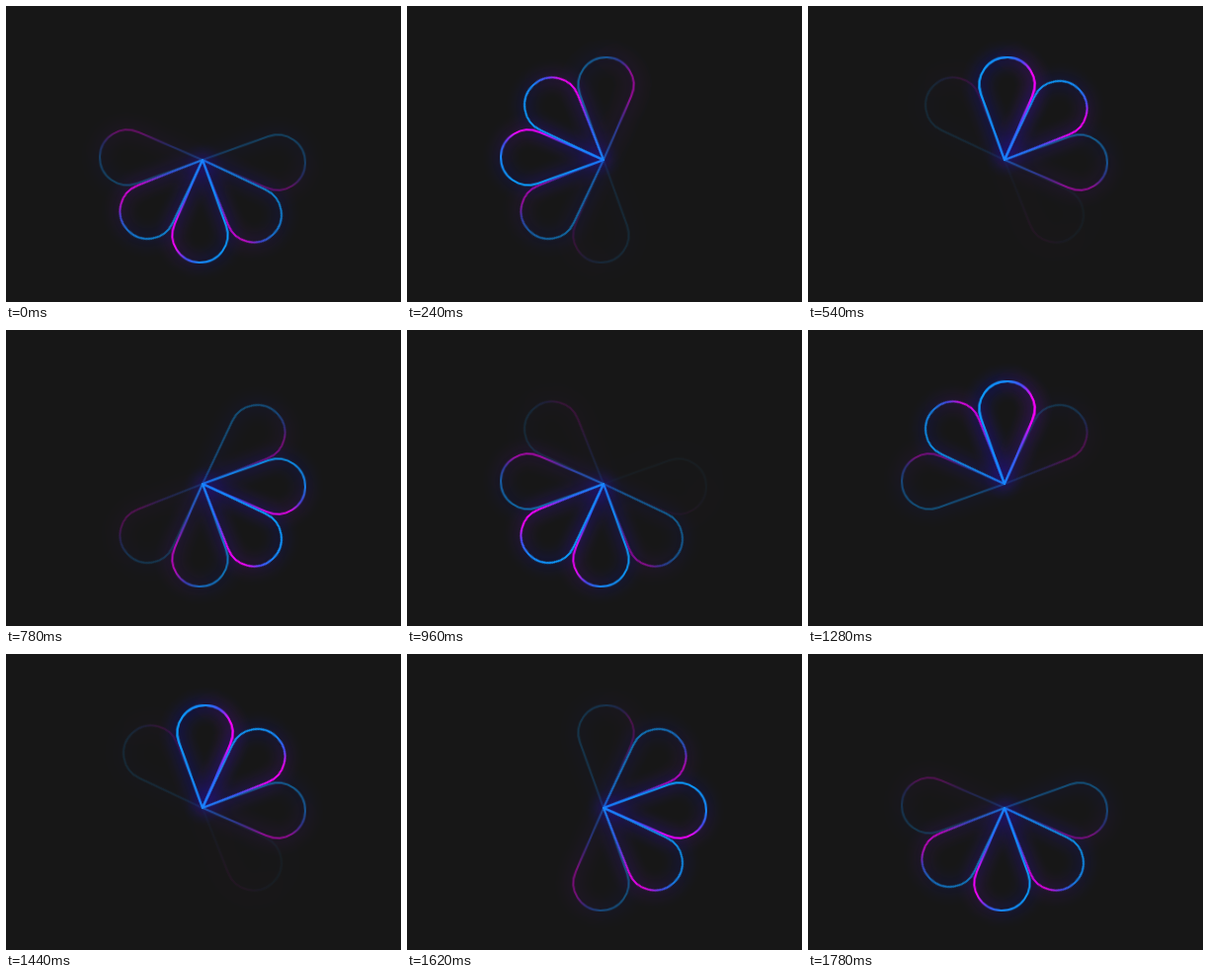
An HTML page that plays this animation: 400x300 px, repeating every 1.8 s.

```html
<!DOCTYPE html>
<html lang="en">
<head>
<meta charset="utf-8">
<title>Petal loader</title>
<style>
  html, body {
    margin: 0;
    width: 100%;
    height: 100%;
    overflow: hidden;
    background: #171717;
  }
  svg { display: block; width: 400px; height: 300px; }
  .petal {
    opacity: 0;
    transform: rotate(calc(var(--i) * 45deg + 1.9deg));
    animation: pulse 900ms linear calc(var(--i) * 100ms - 850ms) infinite;
  }
  @keyframes pulse {
    0%, 20% { opacity: 0; }
    44%, 56% { opacity: 1; }
    80%, 100% { opacity: 0; }
  }
</style>
</head>
<body>
<svg viewBox="0 0 400 300">
  <defs>
    <linearGradient id="neon" gradientUnits="userSpaceOnUse" x1="-28" x2="28" y1="0" y2="0">
      <stop offset="0" stop-color="#0a9dff"/>
      <stop offset=".5" stop-color="#1588ff"/>
      <stop offset=".76" stop-color="#4a4cff"/>
      <stop offset=".95" stop-color="#f0f"/>
    </linearGradient>
    <linearGradient id="haze" gradientUnits="userSpaceOnUse" x1="-28" x2="28" y1="0" y2="0">
      <stop offset=".4" stop-color="#10f"/>
      <stop offset="1" stop-color="#80f"/>
    </linearGradient>
    <filter id="blur" filterUnits="userSpaceOnUse" x="-70" y="-150" width="140" height="200">
      <feGaussianBlur stdDeviation="8"/>
    </filter>
    <path id="drop" d="M0 0L-26 -65.7A28 28 0 1 1 26 -65.7Z" fill="none" stroke-linejoin="round"/>
    <g id="petal">
      <use href="#drop" stroke="url(#haze)" stroke-width="6" opacity=".3" filter="url(#blur)"/>
      <use href="#drop" stroke="url(#neon)" stroke-width="2"/>
    </g>
  </defs>
  <!-- Nine petals on eight spokes: the last one lies over the first. -->
  <g transform="translate(199 156)">
    <use class="petal" href="#petal" style="--i:0"/>
    <use class="petal" href="#petal" style="--i:1"/>
    <use class="petal" href="#petal" style="--i:2"/>
    <use class="petal" href="#petal" style="--i:3"/>
    <use class="petal" href="#petal" style="--i:4"/>
    <use class="petal" href="#petal" style="--i:5"/>
    <use class="petal" href="#petal" style="--i:6"/>
    <use class="petal" href="#petal" style="--i:7"/>
    <use class="petal" href="#petal" style="--i:8"/>
  </g>
</svg>
</body>
</html>
```
